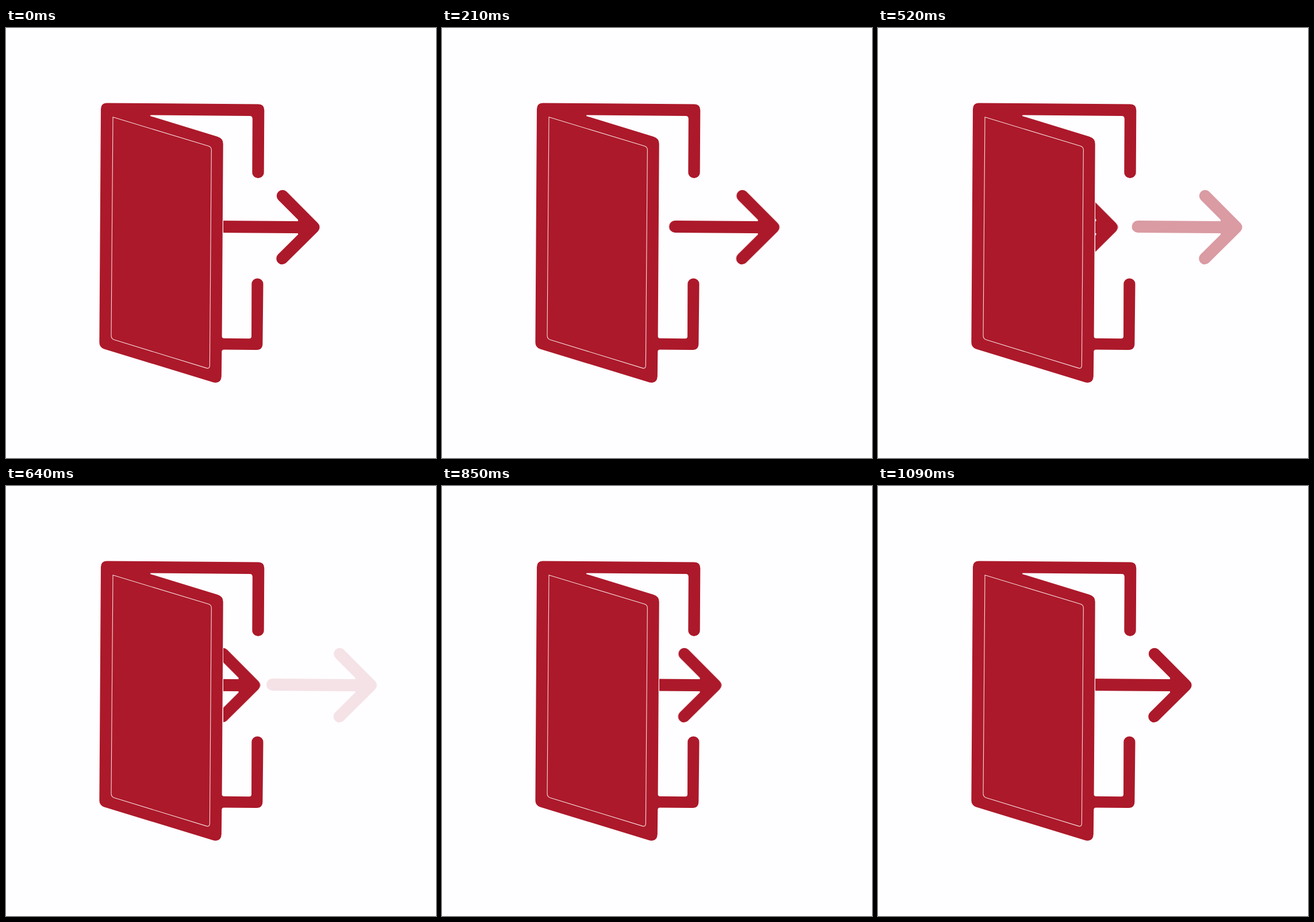
Write an HTML page that moves like this. It is 748 px wide and 748 px high and loops after 1.12 s.

```html
<!DOCTYPE html>
<html lang="en">
<head>
<meta charset="utf-8">
<title>Exit door</title>
<style>
  html, body { margin: 0; width: 100%; height: 100%; overflow: hidden; background: #fefdff; }
  svg { display: block; width: 100vw; height: 100vh; }

  .red { fill: #ac192a; }
  .panel { fill: none; stroke: #f6dfe1; stroke-width: 1.1; }
  .stroke { fill: none; stroke: #ac192a; stroke-linecap: round; stroke-linejoin: round; }

  .leaving { animation: leave 1120ms infinite, fade 1120ms infinite; }
  .coming { animation: come 1120ms infinite; }

  /* Each segment advances in steps of about 30 ms. */
  @keyframes leave {
    0%     { transform: translateX(0); animation-timing-function: steps(7); }
    18.74% { transform: translateX(41.5px); animation-timing-function: steps(6); }
    34.82% { transform: translateX(75px); animation-timing-function: steps(4); }
    46.42% { transform: translateX(88px); animation-timing-function: steps(4); }
    57.14%, 100% { transform: translateX(99.5px); }
  }
  @keyframes fade {
    0%     { opacity: 1; animation-timing-function: step-end; }
    24.1%  { opacity: 1; animation-timing-function: steps(4); }
    34.82% { opacity: .7; animation-timing-function: steps(4); }
    46.42% { opacity: .43; animation-timing-function: steps(4); }
    57.14% { opacity: .12; animation-timing-function: step-end; }
    59.82%, 100% { opacity: 0; }
  }
  @keyframes come {
    0%     { transform: translateX(-222px); animation-timing-function: steps(7); }
    18.74% { transform: translateX(-181px); animation-timing-function: steps(6); }
    34.82% { transform: translateX(-145px); animation-timing-function: steps(4); }
    46.42% { transform: translateX(-128.5px); animation-timing-function: steps(4); }
    57.14% { transform: translateX(-103.5px); animation-timing-function: steps(7); }
    75.89% { transform: translateX(-59.5px); animation-timing-function: steps(8); }
    97.32%, 100% { transform: translateX(0); }
  }
</style>
</head>
<body>
<svg viewBox="0 0 748 748">
  <defs>
    <clipPath id="outside"><rect x="378" y="270" width="370" height="152"/></clipPath>
    <g id="arrow">
      <path class="stroke" stroke-width="20.4" d="M481 292 L535.4 346.6 L480.4 401"/>
      <path class="stroke" stroke-width="21" d="M364 345.5 L530 346.7"/>
      <path class="red" d="M508 333.4 H522 V359.4 H508 Z"/>
    </g>
  </defs>

  <path class="red" d="M175 130.5 L439 132.5 Q449.3 132.6 449.3 143 L448.7 251
    A10.2 10.2 0 0 1 428.3 251 L428.8 158 Q428.8 153 424 152.9 L252 151.4 Q249.5 152.4 252 153.4
    L368 189 Q377.8 192 377.7 202 L375.6 536 Q375.6 539.6 379 539.7 L423 540.2 Q427 540.2 427 536.5
    L427.3 445.5 A10.1 10.1 0 0 1 447.5 445.5 L446.4 549 Q446.2 560 436 560 L379 559.5
    Q375.4 559.5 375.3 563 L374.8 606 Q374 619 361 616.5 L171 558.5 Q162.4 555.5 162.4 547
    L165 141 Q165.2 130.5 175 130.5 Z"/>
  <path class="panel" d="M186 155 L352 205.3 Q357.4 207 357.3 212 L354.4 587 Q354.3 593 349 591.6
    L188 542.2 Q183 540.5 183 535 Z"/>

  <g clip-path="url(#outside)">
    <g class="leaving"><use href="#arrow"/></g>
    <g class="coming"><use href="#arrow"/></g>
  </g>
</svg>
</body>
</html>
```
